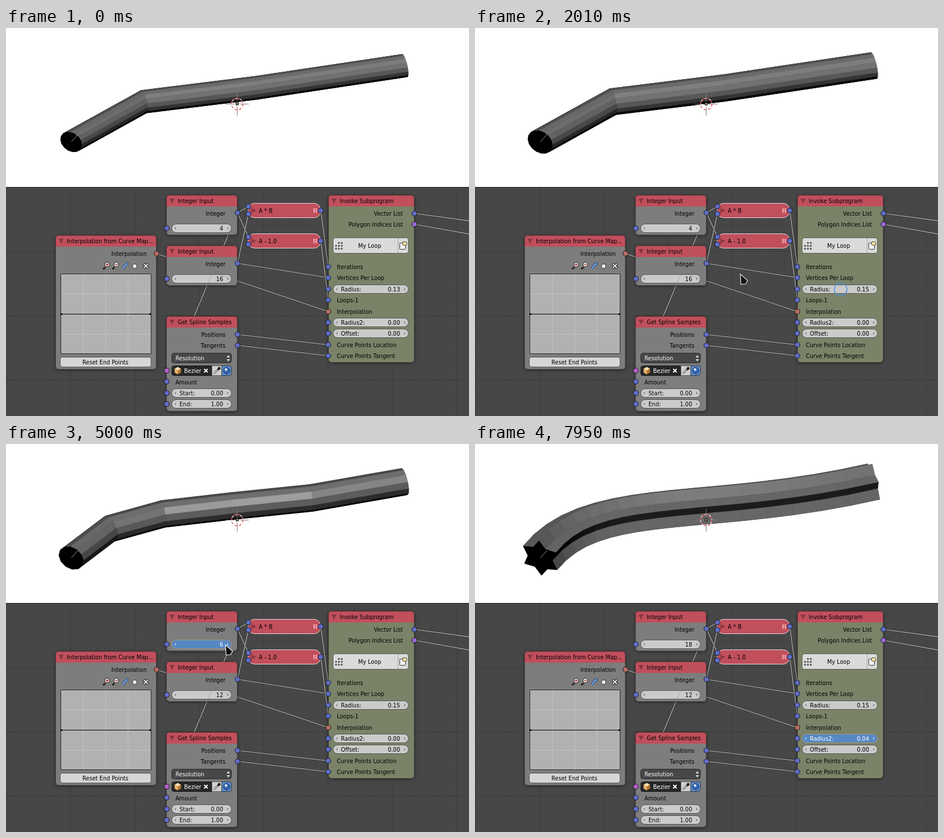
Write an HTML page with a canvas that moves like this. It is 806 px wide and 676 px high and loops after 7990 ms.

```html
<!DOCTYPE html>
<html lang="en">
<head>
<meta charset="utf-8">
<title>Loop tube node setup</title>
<style>
html, body { margin: 0; width: 100%; height: 100%; overflow: hidden; background: #fff; }
canvas { display: block; }
</style>
</head>
<body>
<canvas id="stage" width="806" height="676"></canvas>
<script>
const ctx = document.getElementById('stage').getContext('2d');
const DURATION = 7990;
const RED = '#c14f5c', BLUE = '#5f6dcc', CORAL = '#bd6e5e', PURPLE = '#b95fcb', VIOLET = '#9a68dc';

// ---------- timing ----------
const between = (t, a, b) => t >= a && t < b;
const ramp = (t, a, b) => Math.min(1, Math.max(0, (t - a) / (b - a)));
const smooth = f => f * f * (3 - 2 * f);
const easeOut = f => 1 - (1 - f) ** 2;
const hundredths = v => Math.round(v * 100) / 100;

function pointerAt(t) {
  const toSides = easeOut(ramp(t, 1890, 2300));
  const toLoops = smooth(ramp(t, 3680, 4360));
  const away = smooth(ramp(t, 5930, 6560));
  const toRadius2 = smooth(ramp(t, 6660, 7110));
  return [
    632 - 338 * toSides + 88 * toLoops + 383 * away - 125 * toRadius2,
    452 - 18 * toSides - 14 * Math.sin(Math.PI * toSides) - 84 * toLoops + 225 * away - 67 * toRadius2
  ];
}

function stateAt(t) {
  const sideSteps = 3 * ramp(t, 2420, 3040) + (t >= 3560);
  const sideClick = between(t, 3040, 3140) || between(t, 3560, 3660) ||
    between(t, 2620, 3040) && sideSteps % 1 < .5;
  const loopSteps = 2 * ramp(t, 4560, 5000) + 4 * ramp(t, 5000, 5330) + 8 * ramp(t, 5460, 5930);
  const mode = (active, hover) => active ? 'active' : hover ? 'hover' : '';
  return {
    radius: hundredths(.13 + .13 * ramp(t, 600, 960) - .07 * smooth(ramp(t, 960, 1380)) - .04 * ramp(t, 1400, 1660)),
    radius2: hundredths(.07 * ramp(t, 7330, 7610) - .03 * ramp(t, 7790, 7950)),
    loops: 4 + Math.floor(loopSteps),
    sides: 16 - Math.floor(sideSteps),
    pointer: between(t, 1890, 7150) ? pointerAt(t) : null,
    radiusMode: mode(between(t, 230, 1890)),
    radius2Mode: mode(t >= 7150, t > 6950),
    sidesMode: mode(sideClick, between(t, 2200, 3760)),
    loopsMode: mode(between(t, 4560, 4680) || between(t, 4940, 5930), between(t, 4080, 6000)),
    ripple: between(t, 1890, 2080) ? 5 + (t - 1890) * .05 : 0
  };
}

// ---------- vectors (x right, y down, z away) ----------
const add = (a, b) => a.map((v, i) => v + b[i]);
const sub = (a, b) => a.map((v, i) => v - b[i]);
const mul = (a, s) => a.map(v => v * s);
const dot = (a, b) => a[0] * b[0] + a[1] * b[1] + a[2] * b[2];
const cross = (a, b) => [a[1] * b[2] - a[2] * b[1], a[2] * b[0] - a[0] * b[2], a[0] * b[1] - a[1] * b[0]];
const unit = a => mul(a, 1 / Math.hypot(...a));
const blend = (points, weights) => points.reduce((s, p, i) => add(s, mul(p, weights[i])), [0, 0, 0]);

// ---------- tube ----------
const CURVE = [[113.5, 198.5, 0], [204, 85, 164], [405, 132, 68], [694, 65.5, 136]];
const STEPS = [1, 2, 3].map(i => sub(CURVE[i], CURVE[i - 1]));
const UP = mul(unit(cross(STEPS[0], STEPS[1])), -1);
const LIGHT = unit([0, -.35, -.94]), SHINE = unit([-.04, -.23, -.97]);
const SCALE = 157;

function ring(t, s) {
  const u = 1 - t;
  const center = blend(CURVE, [u * u * u, 3 * u * u * t, 3 * u * t * t, t * t * t]);
  const side = cross(UP, unit(blend(STEPS, [u * u, 2 * u * t, t * t])));
  const points = Array.from({ length: s.sides }, (_, k) => {
    const angle = k / s.sides * 2 * Math.PI;
    const r = SCALE * (s.radius + (k % 2 ? 0 : 2 * s.radius2));
    return add(center, add(mul(UP, r * Math.cos(angle)), mul(side, r * Math.sin(angle))));
  });
  return { center, points };
}

function tubeFaces(rings, sides) {
  const faces = [];
  for (let i = 1; i < rings.length; i++) {
    const a = rings[i - 1], b = rings[i];
    for (let k = 0; k < sides; k++) {
      const j = (k + 1) % sides;
      const quad = [a.points[k], a.points[j], b.points[j], b.points[k]];
      const mid = blend(quad, [.25, .25, .25, .25]);
      let normal = unit(cross(sub(quad[2], quad[0]), sub(quad[3], quad[1])));
      if (dot(normal, sub(mid, mul(add(a.center, b.center), .5))) < 0) normal = mul(normal, -1);
      const front = normal[2] < 0;
      const diffuse = Math.max(0, dot(normal, LIGHT)), shine = Math.max(0, dot(normal, SHINE)) ** 100;
      faces.push({ quad, front, depth: mid[2], gray: front ? Math.round(118 * diffuse + 50 * shine) : 0 });
    }
  }
  return faces.sort((p, q) => p.front - q.front || q.depth - p.depth);
}

function drawTube(s) {
  const rings = Array.from({ length: s.loops }, (_, i) => ring(i / (s.loops - 1), s));
  for (const { quad, gray } of tubeFaces(rings, s.sides)) {
    const color = `rgb(${gray},${gray},${gray})`;
    polygon(quad, color, color, .6);
  }
  polygon(rings[0].points, '#000');
  line([[114, 198], [125, 186]], '#999');
}

// ---------- drawing helpers ----------
function paint(fill, stroke, width = 1) {
  if (fill) { ctx.fillStyle = fill; ctx.fill(); }
  if (stroke) { ctx.strokeStyle = stroke; ctx.lineWidth = width; ctx.stroke(); }
}
function polygon(points, fill, stroke, width) {
  ctx.beginPath();
  points.forEach(p => ctx.lineTo(p[0], p[1]));
  ctx.closePath();
  paint(fill, stroke, width);
}
function line(points, color, width = 1) {
  ctx.beginPath();
  points.forEach(p => ctx.lineTo(p[0], p[1]));
  paint(null, color, width);
}
function circle(x, y, r, fill, stroke, width) {
  ctx.beginPath();
  ctx.arc(x, y, r, 0, 2 * Math.PI);
  paint(fill, stroke, width);
}
function box(x, y, w, h, r, fill, stroke) {
  ctx.beginPath();
  ctx.roundRect(x, y, w, h, r);
  paint(fill, stroke);
}
// Triangle centred on (x, y) whose tip lies at (dx, dy).
function arrow(x, y, dx, dy, color, spread = 1) {
  polygon([[x + dx, y + dy], [x - dx + dy * spread, y - dy + dx * spread],
    [x - dx - dy * spread, y - dy - dx * spread]], color);
}
function cross2d(x, y, r, color, width) {
  line([[x - r, y - r], [x + r, y + r]], color, width);
  line([[x + r, y - r], [x - r, y + r]], color, width);
}
function text(str, x, y, align = 'left', color = '#000') {
  ctx.font = '9.6px "DejaVu Sans", sans-serif';
  ctx.textAlign = align;
  ctx.fillStyle = color;
  ctx.fillText(str, x, y);
}
const socket = ([x, y], color = BLUE) => circle(x, y, 4.4, color, '#16161c');

function node(x, y, w, h, title, body = 'rgba(133,133,133,.93)') {
  ctx.save();
  ctx.shadowColor = 'rgba(0,0,0,.55)';
  ctx.shadowBlur = 5;
  ctx.shadowOffsetY = 1;
  box(x, y, w, h, 6, body);
  ctx.restore();
  box(x, y, w, 20, [6, 6, 0, 0], RED);
  box(x + .5, y + .5, w - 1, h - 1, 6, null, 'rgba(35,25,25,.55)');
  arrow(x + 10, y + 10.5, 0, 4.5, '#873843');
  text(title, x + 20, y + 14);
}

function field(x, y, w, label, value, mode = '') {
  const active = mode === 'active';
  const fill = active ? '#5688c4' : mode === 'hover' ? '#e2e2e2' : '#cbcbcb';
  const ink = active ? '#fff' : '#000', tip = active ? '#a8c8ee' : '#8b8b8b';
  box(x + .5, y + .5, w - 1, 15, 7.5, fill, active ? '#a8977a' : '#555');
  arrow(x + 6.5, y + 8, -1.5, 0, tip, 1.7);
  arrow(x + w - 6.5, y + 8, 1.5, 0, tip, 1.7);
  text(label, x + 14, y + 12, 'left', ink);
  text(value, x + w - 15, y + 12, 'right', ink);
}

// ---------- node editor ----------
const LOOPS_Y = 291, SIDES_Y = 379, PRODUCT_Y = 305, MINUS_Y = 358;
const intOut = y => [403, y + 31];
const mathIn = (y, i) => [422, y + 6 + 13 * i];
const mathOut = y => [548, y + 13];
const splineOut = i => [403, 534 + 19 * i];
const splineIn = i => [280, Math.round(597 + 19.3 * i)];
const subIn = i => [561, Math.round(416 + 19.4 * i)];
const subOut = i => [711, 323 + 19 * i];
const curveOut = [262, 393];

const LINKS = [
  [intOut(LOOPS_Y), mathIn(PRODUCT_Y, 0)], [intOut(LOOPS_Y), mathIn(MINUS_Y, 0)],
  [intOut(LOOPS_Y), splineIn(1)], [intOut(SIDES_Y), mathIn(PRODUCT_Y, 1)],
  [intOut(SIDES_Y), subIn(1)], [curveOut, subIn(4)],
  [mathOut(PRODUCT_Y), subIn(0)], [mathOut(MINUS_Y), subIn(3)],
  ...[0, 1].map(i => [splineOut(i), subIn(7 + i)]),
  ...[0, 1].map(i => [subOut(i), add(subOut(i), [96, 13 + 4 * i])])
];
function drawLinks(alpha) {
  ctx.globalAlpha = alpha;
  for (const link of LINKS) {
    line(link, 'rgba(25,25,25,.4)', 2.6);
    line(link, '#c0c0c0', 1.2);
  }
  ctx.globalAlpha = 1;
}

function drawBackdrop() {
  ctx.fillStyle = '#474747';
  ctx.fillRect(0, 277, 806, 399);
  for (let i = 0; i < 37; i++) {
    const p = Math.round(i * 22.4) + .5, color = i % 5 ? '#434343' : '#3d3d3d';
    line([[p, 277], [p, 676]], color);
    line([[0, 277 + p], [806, 277 + p]], color);
  }
  line([[0, 277.5], [806, 277.5]], '#151515');
}

function magnifier(x, y, plus) {
  line([[x - 2, y + 3], [x - 6, y + 6]], '#2b2118', 3);
  circle(x + 1, y - 2, 4, '#f3eaea', '#222');
  line([[x - 1, y - 2], [x + 3, y - 2]], '#a22', 1.4);
  if (plus) line([[x + 1, y - 4], [x + 1, y]], '#a22', 1.4);
}

function drawCurveNode() {
  node(86, 361, 176, 234, 'Interpolation from Curve Map...');
  text('Interpolation', 245, 397, 'right');
  socket(curveOut, CORAL);
  magnifier(175, 414, true);
  magnifier(191, 414, false);
  for (const [color, width] of [['#1c3a72', 4], ['#7db0f2', 2]]) {
    line([[203, 419], [210, 411]], color, width);
    circle(211, 411, 2, null, color, width / 2);
  }
  circle(224, 415, 4, '#eee', '#333');
  cross2d(243.5, 414.5, 4, '#222', 4);
  cross2d(243.5, 414.5, 3.5, '#eee', 1.8);
  box(95.5, 428.5, 157, 139, 0, '#b1b1b1', '#2a2a2a');
  for (let i = 1; i < 4; i++) {
    line([[95.5 + 39 * i, 429], [95.5 + 39 * i, 567]], '#c1c1c1');
    line([[96, 428.5 + 35 * i], [252, 428.5 + 35 * i]], i === 2 ? '#000' : '#c1c1c1');
  }
  for (const x of [95, 250]) box(x, 497, 3, 3, 0, '#000');
  box(94.5, 573.5, 158, 17, 4, '#d6d6d6', '#555');
  text('Reset End Points', 173, 586, 'center');
}

function integerNode(y, value, mode) {
  node(279, y, 124, 70, 'Integer Input');
  text('Integer', 382, y + 36, 'right');
  field(288, y + 50, 105, '', value, mode);
  socket(intOut(y));
  socket([280, y + 58]);
}

function mathNode(y, title) {
  box(421.5, y + .5, 126, 25, 11, RED, '#e6dadb');
  arrow(431.5, y + 13, 4.5, 0, '#8d3a46');
  text(title, 440, y + 17);
  for (const x of [535, 539]) box(x, y + 9, 2.5, 8, 0, '#f0a2aa');
  socket(mathIn(y, 0));
  socket(mathIn(y, 1));
  socket(mathOut(y));
}

function cubeIcon(x, y, r) {
  const corner = k => [x + r * Math.cos(k * Math.PI / 3 + Math.PI / 6), y + r * Math.sin(k * Math.PI / 3 + Math.PI / 6)];
  ['#e8b067', '#ffe1ae', '#b87932'].forEach((color, i) => {
    const k = 1 + 2 * i;
    polygon([[x, y], corner(k), corner(k + 1), corner(k + 2)], color);
  });
}

function drawSplineNode() {
  node(279, 502, 124, 166, 'Get Spline Samples');
  ['Positions', 'Tangents'].forEach((label, i) => {
    text(label, 382, 538 + 19 * i, 'right');
    socket(splineOut(i));
  });
  box(288.5, 566.5, 104, 17, 4, '#474747', '#2c2c2c');
  text('Resolution', 295, 579, 'left', '#fff');
  arrow(387, 572, 0, -2, '#ddd', 1.5);
  arrow(387, 579, 0, 2, '#ddd', 1.5);
  box(288.5, 588.5, 70, 17, [4, 0, 0, 4], '#262626', '#1c1c1c');
  cubeIcon(299, 597, 6.5);
  text('Bezier', 310, 601, 'left', '#fff');
  cross2d(348, 597, 3, '#fff', 2);
  box(358.5, 588.5, 17, 17, 0, '#d0d0d0', '#555');
  line([[362, 602], [370, 594]], '#333', 3);
  line([[362, 602], [368, 596]], '#fff', 1.3);
  circle(371, 593, 2.5, '#222');
  box(375.5, 588.5, 17, 17, [0, 4, 4, 0], '#5c8ccb', '#333');
  circle(384, 597, 5.5, '#3867b5', '#16305e');
  circle(383, 595, 2.3, '#d9e8f6');
  text('Amount', 295, 621);
  field(288, 628, 105, 'Start:', '0.00');
  field(288, 647, 105, 'End:', '1.00');
  for (let i = 0; i < 4; i++) socket(splineIn(i), i ? BLUE : PURPLE);
}

function drawSubprogramNode(s) {
  node(561, 291, 150, 292, 'Invoke Subprogram', 'rgba(127,136,108,.95)');
  ['Vector List', 'Polygon Indices List'].forEach((label, i) => {
    text(label, 691, 327 + 19 * i, 'right');
    socket(subOut(i), i ? VIOLET : BLUE);
  });
  box(569.5, 365.5, 131, 27, 4, '#dadada', '#555a48');
  line([[682.5, 366], [682.5, 392]], '#a5a5a5');
  text('My Loop', 633, 383, 'center');
  for (let i = 1; i < 9; i++)
    box(573.5 + 5 * (i % 3), 373.5 + 5 * Math.floor(i / 3), 2, 2, 0, '#eee', '#333');
  box(685.5, 374.5, 10, 11, 1, '#f4f4f4', '#333');
  box(690.5, 372.5, 7, 6, 1, '#efe2a4', '#54472a');
  ['Iterations', 'Vertices Per Loop', '', 'Loops-1', 'Interpolation', '', '', 'Curve Points Location', 'Curve Points Tangent']
    .forEach((label, i) => {
      text(label, 576, subIn(i)[1] + 4);
      socket(subIn(i), i === 4 ? CORAL : BLUE);
    });
  field(569, 447, 132, 'Radius:', s.radius.toFixed(2), s.radiusMode);
  field(569, 505, 132, 'Radius2:', s.radius2.toFixed(2), s.radius2Mode);
  field(569, 524, 132, 'Offset:', '0.00');
}

// ---------- overlays ----------
function drawViewCursor() {
  const x = 402.5, y = 132.5;
  circle(x, y, 10, null, '#fff', 1.2);
  ctx.setLineDash([4, 4]);
  circle(x, y, 10, null, '#e02424', 1.2);
  ctx.setLineDash([]);
  for (const d of [-1, 1]) {
    line([[x + 5 * d, y], [x + 20 * d, y]], '#8a7474');
    line([[x, y + 5 * d], [x, y + 20 * d]], '#8a7474');
  }
  circle(x, y - .5, 2.6, '#8b8067', '#000');
}
function drawPointer([x, y]) {
  polygon([[x, y], [x + 12.5, y + 11], [x + 9, y + 17], [x + 1, y + 17.5]], '#111', '#fff', 1.1);
}

function draw(t) {
  const s = stateAt(t);
  ctx.fillStyle = '#fff';
  ctx.fillRect(0, 0, 806, 676);
  drawTube(s);
  drawViewCursor();
  drawBackdrop();
  drawLinks(1);
  drawCurveNode();
  integerNode(LOOPS_Y, s.loops, s.loopsMode);
  integerNode(SIDES_Y, s.sides, s.sidesMode);
  drawSplineNode();
  mathNode(PRODUCT_Y, 'A * B');
  mathNode(MINUS_Y, 'A - 1.0');
  drawSubprogramNode(s);
  drawLinks(.2);
  if (s.ripple) circle(636.5, 455.5, s.ripple, null, '#4a90e0', 1.4);
  if (s.pointer) drawPointer(s.pointer);
}

function frame() {
  draw(performance.now() % DURATION);
  requestAnimationFrame(frame);
}
frame();
</script>
</body>
</html>
```
